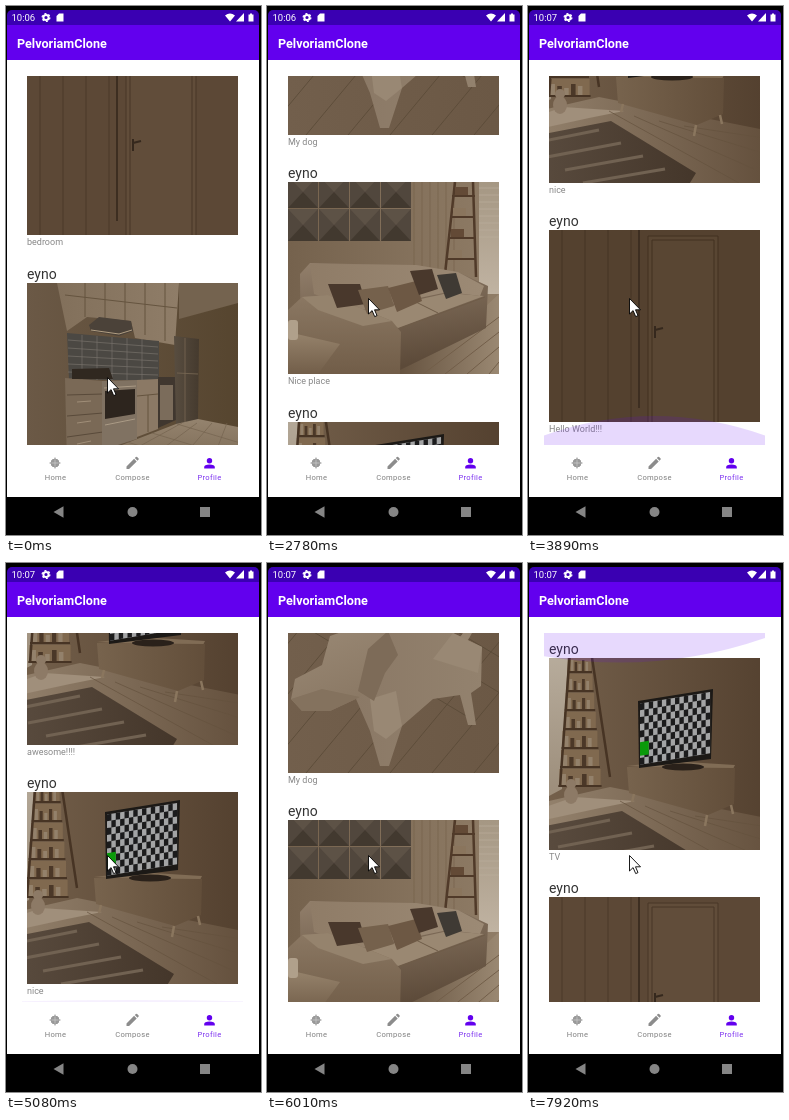
An HTML page for the animation above (8000 ms loop, 255 px wide and 529 px high).

```html
<!DOCTYPE html>
<html lang="en">
<head>
<meta charset="utf-8">
<title>Photo feed</title>
<style>
  html, body { margin: 0; width: 100%; height: 100%; overflow: hidden; background: #000; }
  svg { display: block; width: 100%; height: 100%; font-family: Roboto, sans-serif; }
</style>
</head>
<body>
<svg id="stage" viewBox="0 0 255 529"></svg>
<script>
const W = 211, H = 192, PITCH = 239.3, FIRST = 95, LOOP = 8000;

// Shape helpers
const poly = (fill, points) => `<polygon fill="${fill}" points="${points}"/>`;
const rect = (fill, x, y, w, h, more = '') => `<rect fill="${fill}" x="${x}" y="${y}" width="${w}" height="${h}" ${more}/>`;
const line = (color, d, width = 1) => `<path d="${d}" fill="none" stroke="${color}" stroke-width="${width}"/>`;
const text = (str, x, y, size, fill, more = '') => `<text x="${x}" y="${y}" font-size="${size}" fill="${fill}" ${more}>${str}</text>`;
const repeat = (n, draw) => Array.from({ length: n }, (_, i) => draw(i)).join('');

const fades = [];
function fade(from, to, dx = 1, dy = 0) {
  const id = 'fade' + fades.length;
  fades.push(`<linearGradient id="${id}" x2="${dx}" y2="${dy}"><stop stop-color="${from}"/><stop offset="1" stop-color="${to}"/></linearGradient>`);
  return `url(#${id})`;
}

function kitchen() {
  return rect(fade('#6b5946', '#56452f'), 0, 0, W, H)
    + poly(fade('#82705b', '#8f7d68'), '30,0 152,0 148,62 108,55 104,38 60,34 40,48')
    + repeat(5, i => line('#65543f', `M${58 + i * 20} 0V${34 + i * 6}`))
    + line('#65543f', 'M38 12L150 25')
    + poly('#74634f', '152,0 211,0 211,20 152,36')
    + poly('#4b4843', '40,50 132,58 132,98 42,96')
    + repeat(5, i => line('#77716a', `M41 ${57 + i * 8}L131 ${64 + i * 7}M${55 + i * 15} ${52 + i}V97`, .7))
    + poly('#4b4239', '62,42 72,34 104,38 106,48 92,53 64,48')
    + line('#b09d82', 'M64 47L92 51L105 47')
    + poly('#7a6956', '38,95 76,98 76,176 40,184')
    + repeat(3, i => line('#594a3a', `M40 ${112 + i * 21}L76 ${111 + i * 19}`)
      + line('#a08e78', `M50 ${119 + i * 21}L64 ${118 + i * 20}`))
    + poly('#302820', '45,86 82,85 86,96 45,96')
    + poly('#807262', '75,98 110,97 110,156 75,167')
    + poly('#2d251e', '78,108 108,106 108,131 78,136')
    + line('#aa9a85', 'M77 105L109 103M78 142L108 136')
    + poly('#8b7965', '110,97 131,96 131,146 110,154')
    + line('#65543f', 'M110 113L131 111M121 112V149')
    + poly('#40372f', '131,94 149,94 149,137 131,145')
    + rect('#7b6c5b', 133, 102, 13, 35)
    + poly(fade('#584d40', '#453a2e'), '147,53 172,56 171,137 149,142')
    + line('#796955', 'M158 55V139M150 90L171 91', .8)
    + poly(fade('#94836e', '#77654f', 0, 1), '38,184 149,141 171,136 211,144 211,192 38,192')
    + repeat(4, i => line('#746350', `M${60 + i * 40} 192L${155 + i * 15} 140M${75 + i * 25} ${168 - i * 9}L${155 + i * 25} ${192 - i * 9}`, .7))
    + poly('#574735', '0,164 38,182 38,192 0,192');
}

function dog() {
  return rect(fade('#725f4c', '#6b5845'), 0, 0, W, H)
    + repeat(9, i => line('#594936', `M${i * 42 - 150} 192L${i * 42 + 10} 0M${i * 24} ${i % 3 * 50}l60 36`, .8))
    + poly('#5a4a38', '140,0 211,0 211,52 165,30')
    + line('#968571', 'M166 66Q184 56 184 30Q184 14 192 2', 8)
    + poly(fade('#8b7966', '#93826e'), '98,50 165,52 194,66 193,105 183,112 188,144 180,144 172,114 145,118 114,145 101,185 92,185 82,150 68,118')
    + poly('#998874', '145,78 165,52 194,66 190,92')
    + poly('#998874', '82,118 108,110 114,145 98,158 86,150')
    + poly(fade('#9a8975', '#8a7864', .5, 1), '42,55 65,47 100,50 95,80 72,116 42,130 14,130 3,118 7,98 34,84')
    + poly('#84725e', '3,118 34,108 72,116 42,130 14,130')
    + poly('#7d6b58', '100,50 80,68 70,110 86,120 97,92 110,74');
}

function sofa() {
  const panel = (x, y) => rect('#51473d', x, y, 30, 32)
    + poly('#5d5246', `${x},${y} ${x + 30},${y} ${x + 15},${y + 16}`)
    + poly('#42392f', `${x},${y + 32} ${x + 30},${y + 32} ${x + 15},${y + 16}`);
  const cushion = (fill, x, y, w, tilt) => poly(fill, `${x},${y} ${x + w - 6},${y - tilt} ${x + w},${y + 20 - tilt} ${x + 9},${y + 24}`);
  return rect(fade('#75624d', '#8f7c66'), 0, 0, W, H)
    + repeat(6, i => line('#745f49', `M${126 + i * 8} 0V90`, .6))
    + repeat(8, i => panel(i % 4 * 31, i < 4 ? -6 : 27))
    + rect(fade('#a59783', '#c0b3a2', 0, 1), 191, 0, 20, 112)
    + repeat(8, i => line('#b9ad9d', `M191 ${6 + i * 7}H211`, .7))
    + line('#503a29', 'M167 0L157 92M185 0L188 95', 2.5)
    + repeat(4, i => line('#503a29', `M${164 - i * 2} ${14 + i * 21}H187`, 2)
      + rect(i % 2 ? '#8a755d' : '#634a36', 167 - i * 2, 5 + i * 21, 13, 8))
    + poly(fade('#5f4c39', '#9a8872'), '100,192 170,150 211,112 211,192')
    + repeat(4, i => line('#725e49', `M${135 + i * 22} 192L211 ${135 + i * 15}`))
    + poly(fade('#927f6b', '#5c4a39', .25, 1), '12,92 22,81 65,82 128,83 170,90 200,104 198,146 112,188 92,192 13,192')
    + poly(fade('#8f7c67', '#9c8a75'), '22,82 128,83 170,90 196,104 192,114 160,110 74,128 26,112')
    + poly('#9a8872', '74,130 160,111 196,114 110,146')
    + line('#6f5c48', 'M110 147L197 115M128 120L150 131')
    + poly(fade('#8b7863', '#715d48', 0, 1), '0,128 14,115 40,113 104,139 113,150 112,192 0,192')
    + poly('#95836d', '14,115 40,113 104,139 75,144 30,128')
    + cushion('#49382c', 40, 102, 38, 0)
    + cushion('#75614c', 70, 108, 36, 4)
    + cushion('#6d5844', 100, 106, 34, 7)
    + cushion('#49382c', 122, 89, 28, 2)
    + cushion('#3f3a34', 149, 93, 25, 2)
    + poly(fade('#96836c', '#725e49', 0, 1), '0,150 52,162 30,192 0,192')
    + rect('#b0a08b', 0, 138, 10, 20, 'rx="3"');
}

function room(dx, dy) {
  const cells = repeat(72, i => `M${i % 8 * 2 + (i >> 3) % 2} ${i >> 3}h1v1h-1z`);
  // The shelf widens and leans towards the floor
  const shelf = i => {
    const x = 9 - i * 1.6, y = i * 19 - 26, w = 22 + i * 3.2;
    return rect('#80694f', x, y, w, 17)
      + repeat(5, j => rect(j % 2 ? '#4b3828' : '#93816b', x + 2 + j * w / 6, y + 5 + j % 3 * 2, w / 9, 11 - j % 3 * 2))
      + line('#473424', `M${x - 1} ${y + 17}h${w + 2}`, 2);
  };
  return `<g transform="translate(${dx} ${dy})">`
    + rect(fade('#75614c', '#503d2c'), -20, -30, 260, 240)
    + poly(fade('#b8ad9d', '#9b8c79', 0, 1), '-20,-30 8,-30 2,108 -20,120')
    + poly(fade('#94826d', '#5f4b38'), '-20,122 50,106 211,138 240,145 240,210 -20,210')
    + poly('#a08f7b', '-20,128 14,116 75,120 40,127 -20,140')
    + repeat(4, i => line('#65523e', `M${60 + i * 25} ${120 + i * 5}L${190 + i * 15} ${192 - i * 14}`, .7))
    + repeat(7, shelf)
    + line('#473424', 'M10 -30L0 106M31 -30L50 96', 2.5)
    + poly(fade('#5a4c3f', '#44362a'), '-20,146 62,130 147,182 130,210 -20,210')
    + repeat(4, i => line('#74655500', '') + line('#716252', `M${i * 18 - 20} ${153 + i * 13}L${50 + i * 22} ${139 + i * 13}`, 3))
    + `<g fill="#8d7a66"><circle cx="11" cy="103" r="5"/><ellipse cx="11" cy="114" rx="7" ry="9"/></g>`
    + poly('#806c55', '67,85 110,80 175,84 172,90')
    + poly(fade('#77634d', '#624e3a'), '67,86 175,87 174,123 148,134 69,112')
    + line('#8a765e', 'M74 113L72 121M147 134L145 145M171 124L173 133', 2.5)
    + `<ellipse cx="123" cy="86" rx="21" ry="3.500" fill="#2a211a"/>`
    + poly('#1c1916', '78,20 153,8 151,78 79,87')
    + `<g transform="matrix(4.38 -.72 0 6.8 80 22.5)">${rect('#a3a4a5', 0, 0, 16, 9)}<path d="${cells}" fill="#1b1b1c"/>`
    + rect('#0a9a0a', 0, 5.7, 2, 2) + '</g></g>';
}

function door(wall, leaf, edge) {
  return rect(wall, 0, 0, W, H)
    + repeat(4, i => line(edge, `M${13 + i * 23} 0V192`, .8))
    + line('#3d2e21', 'M90 0V178', 2)
    + rect(leaf, 99, 6, 70, 186)
    + line(edge, 'M99 192V6H169V192M103 192V10H165V192')
    + line('#35281d', 'M106 96V108M106 100L114 98', 2);
}

const posts = [
  ['TV', room(11, 23)],
  ['bedroom', door('#5c4836', '#614d3a', '#483727')],
  ['Kitchen', kitchen()],
  ['My dog', dog()],
  ['Nice place', sofa()],
  ['awesome!!!!', room(3, 4)],
  ['nice', room(0, 0)],
  ['Hello World!!!', door('#54412f', '#594633', '#423121')],
];

const feed = posts.map(([caption, art], i) => `<g transform="translate(21 ${Math.round(FIRST + i * PITCH)})">`
  + text('eyno', 0, -4, 14, '#333')
  + `<g clip-path="url(#photo)">${art}</g>`
  + text(caption, 0, H + 10, 9, '#888') + '</g>').join('');

const label = (str, x, fill) => text(str, x, 474, 7.6, fill, 'text-anchor="middle" letter-spacing=".3"');

document.getElementById('stage').innerHTML = `
<defs>
  <clipPath id="photo"><rect width="${W}" height="${H}"/></clipPath>
  <clipPath id="view"><rect x="16" y="70" width="221" height="369"/></clipPath>
  ${fades.join('')}
</defs>`
  + rect('#fff', 1, 30, 252, 461)
  + rect('#3a00b2', 1, 4, 252, 30, 'rx="5"')
  + rect('#6200ee', 1, 19, 252, 35)
  + text('10:06', 5.5, 15, 9.5, '#fff', 'id="clock"')
  + `<circle cx="40" cy="11.5" r="2.6" fill="none" stroke="#fff" stroke-width="2"/>
  <circle cx="40" cy="11.5" r="3.9" fill="none" stroke="#fff" stroke-width="1.2" stroke-dasharray="2 2.08"/>
  <path d="M53 7.5h4.5v8h-7v-5.5zM219 9.5q5-4 10 0l-5 6zM238 7v8.500h-8zM242.500 8.500h1.500v-1h2v1h1.500v7h-5z" fill="#fff"/>`
  + text('PelvoriamClone', 11, 42, 12.6, '#fff', 'font-weight="700"')
  + `<g clip-path="url(#view)"><g id="feed">${feed}</g><path id="glow" fill="#6200ee"/></g>
  <g fill="#999" stroke="#999"><circle cx="49" cy="457" r="4"/><path d="M49 451.500v11M43.500 457h11"/></g>
  <path d="M49 453.500v7M45.500 457h7" stroke="#ccc" stroke-width=".7"/>
  <path d="M120.500 463v-2.600l7.600-7.600 2.600 2.600-7.600 7.600zM128.800 452l1.100-1.100q.6-.5 1.200 0l1.500 1.500q.5.600 0 1.200l-1.100 1.100z" fill="#8c8c8c"/>
  <g fill="#6200ee"><circle cx="203.500" cy="454.700" r="2.700"/><path d="M198.200 462.500v-1.400q0-2.700 5.300-2.700t5.300 2.700v1.400z"/></g>`
  + label('Home', 49.5, '#808080') + label('Compose', 126.5, '#808080') + label('Profile', 203.5, '#7d33f0')
  + `<path d="M47.500 506l10-5.800v11.600z" fill="#858585"/><circle cx="126.500" cy="506" r="5" fill="#858585"/>
  <rect x="194" y="501" width="10" height="10" fill="#858585"/>
  <path id="cursor" d="M.5.500v15.500l3.600-3.400 2.600 6 2.300-1-2.500-5.800h5z" fill="#fff" stroke="#000" stroke-width=".9"/>`;

// Flicks of the feed: start ms, end ms, number of steps, scroll position reached
const flicks = [[1640, 1760, 2, 550], [2350, 2470, 2, 780], [2780, 2930, 2, 908], [3490, 3890, 4, 1546],
  [4960, 5080, 2, 1302], [5350, 6010, 6, 795], [7380, 7500, 2, 0]];

function scrollAt(t) {
  let pos = 297;
  for (const [start, end, steps, goal] of flicks) {
    if (t < start) break;
    const done = Math.floor((t - start) / (end - start) * (steps - 1) + 1e-6) + 1;
    const left = 1 - Math.min(1, done / steps);
    pos = goal + (pos - goal) * left * left;
  }
  return pos;
}

const ramp = (t, from, to) => Math.min(1, Math.max(0, (t - from) / (to - from)));
const $ = id => document.getElementById(id);

// Overscroll glow: held at the end of the feed, then at its top
function glowAt(t) {
  if (t >= 3890 && t < 5350) {
    const gone = ramp(t, 4300, 5080), depth = 29 - 27 * gone ** 2;
    return [`M16 439v${-depth * .33}Q126 ${439 - depth * 1.67} 237 ${439 - depth * .33}V439z`, .15 - .09 * gone];
  }
  if (t >= 7500) {
    const depth = 34 - 5 * ramp(t, 7500, 7920);
    return [`M16 70v${depth * .8}Q130 ${70 + depth * 1.45} 237 ${70 + depth * .17}V70z`, .15];
  }
  return ['', 0];
}

function frame(now) {
  const t = now % LOOP, [path, opacity] = glowAt(t);
  $('feed').setAttribute('transform', `translate(0 ${-Math.round(scrollAt(t))})`);
  $('cursor').setAttribute('transform', `translate(101 ${t < 500 ? 371 : t < 640 ? 361 : 292})`);
  $('glow').setAttribute('d', path);
  $('glow').setAttribute('opacity', opacity);
  $('clock').textContent = t < 3640 ? '10:06' : '10:07';
  requestAnimationFrame(frame);
}
frame(performance.now());
</script>
</body>
</html>
```
